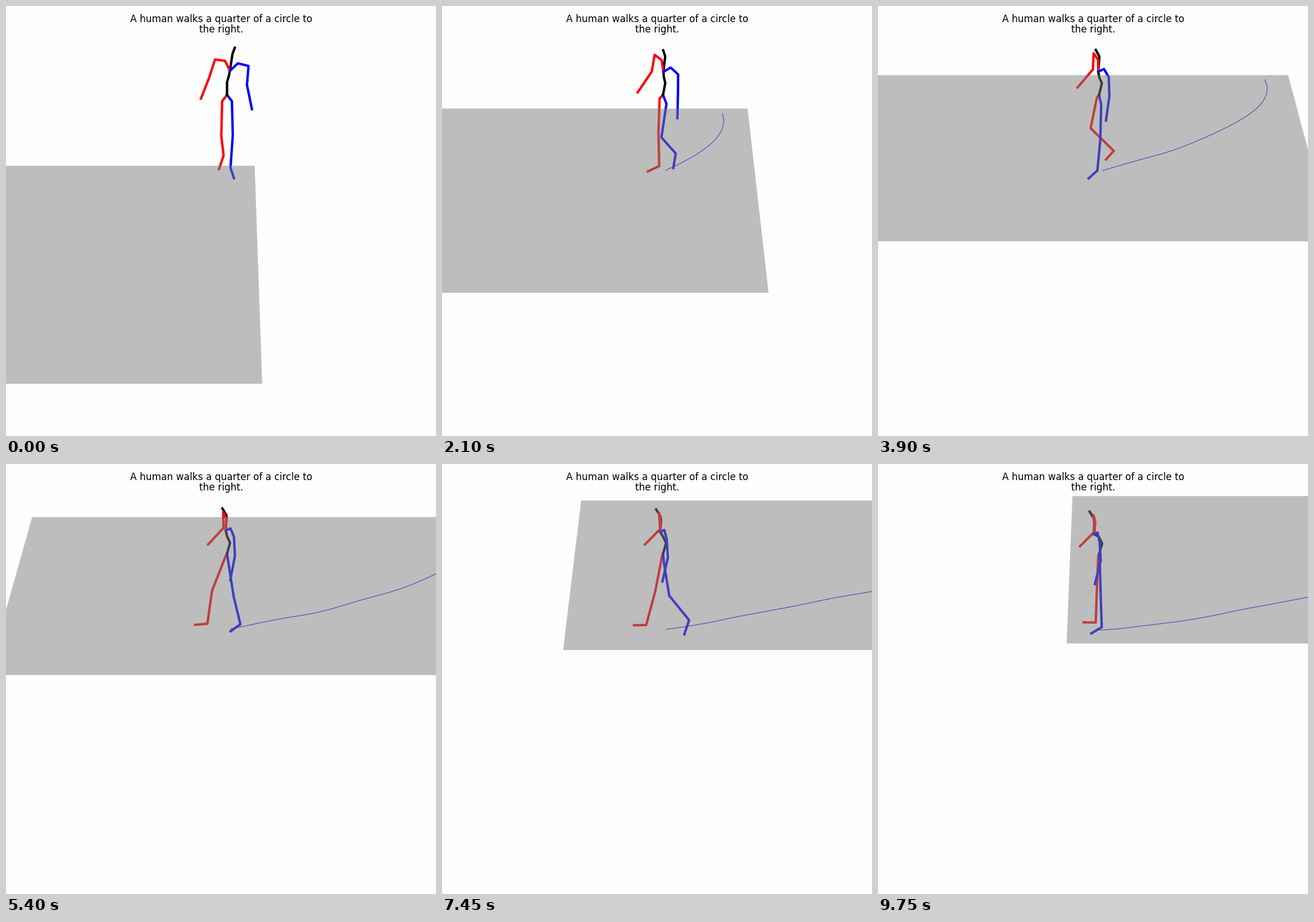
A matplotlib script that plays this animation: 748 px wide and 748 px high, repeating every 9.8 s.

```python
import numpy as np
import matplotlib.pyplot as plt
from matplotlib.animation import FuncAnimation
from matplotlib.patches import Polygon

SIZE, DPI, FPS, FRAMES = 748, 100, 20, 196
CYCLE = 1.45                       # seconds per full walk cycle
TILT = 0.77                        # vertical squeeze of level distances

# Ground camera: screen scale grows as a floor point comes nearer.
CENTER_X, HORIZON, DEPTH, FEET = 384, -1112, 6480, 4.63
FLOOR_X = (-0.6466, 0.0346)

# Key points of the walk: time, sideways, towards the viewer
ROUTE = np.array([
    (0, 0, .034), (1, -.0128, .2066), (2.1, -.0794, .3954),
    (3.9, -.2324, .6286), (5.4, -.365, .7498), (6.55, -.4567, .8343),
    (8, -.5605, .9061), (9, -.6024, .9225), (9.75, -.607, .9215)])


def smooth(t, ts, ys):
    """Cubic Hermite interpolation through the points (ts, ys)."""
    slope = np.gradient(ys, ts, axis=0, edge_order=2)
    i = int(np.clip(np.searchsorted(ts, t, "right") - 1, 0, len(ts) - 2))
    h = ts[i + 1] - ts[i]
    u = (t - ts[i]) / h
    return ((1 + 2 * u) * (1 - u) ** 2 * ys[i] + u * (1 - u) ** 2 * h * slope[i]
            + u * u * (3 - 2 * u) * ys[i + 1] + u * u * (u - 1) * h * slope[i + 1])


def ease(u):
    u = np.clip(u, 0, 1)
    return u * u * (3 - 2 * u)


def bump(phase, start, width):
    u = ((phase - start) % 1) / width
    return np.sin(np.pi * u) ** 2 if u < 1 else 0.0


def walk_phase(t):
    """Walk cycles done; whole numbers are right heel strikes."""
    return np.interp(t, [0, 2.1, 3.9, 5.4, 8.35, 9.2],
                     [.76, 2.26, 3.75, 4.91, 6.6, 7])


def project(x, z):
    """Floor point relative to the walker -> pixels."""
    q = DEPTH / (FEET - z)
    return np.stack([CENTER_X + x * q, q + HORIZON], axis=-1)


def place(points, turn, root_y):
    """Body points (forward, right, up) -> pixels, facing the given way."""
    a, b, h = np.transpose(points)
    s, c = np.sin(turn), np.cos(turn)
    return np.stack([CENTER_X - a * s - b * c,
                     root_y + TILT * (a * c - b * s) - h], axis=-1)


times = np.arange(FRAMES) / FPS
path = np.array([smooth(t, ROUTE[:, 0], ROUTE[:, 1:]) for t in times])
speed = np.hypot(*(np.gradient(path, axis=0) * FPS * (1400, 392)).T)
path[:, 1] -= (0.003 * np.sin(np.pi * times / times[-1])
               * np.sin(2 * np.pi * (walk_phase(times) - 0.1)))


def leg(side, phase, pace, bob):
    """Root, hip, knee, ankle and toe; side is 1 for right, -1 for left."""
    p = phase % 1
    swing = 0.31 - p if p < 0.62 else -0.31 + 0.62 * ease((p - 0.62) / 0.38)
    step = pace * CYCLE * swing - 5 * min(1, pace / 110)
    lift = bump(p, 0.45, 0.6) * min(1, pace / 110)
    push = bump(p, 0.42, 0.48) * min(1, pace / 80)
    ankle = np.array([step, 6 * side, bob - 124 + 13 * lift])
    knee = (0.4 * step + 24 * lift, 10 * side, 9 * lift - 70)
    toe = ankle + (20 - 13 * push, 1 + 7 * side, -3 - 20 * push)
    return [(0, 0, 0), (0, 8.5 * side, -11), knee, ankle, toe]


def arm(side, elbow, wrist):
    """Collar, shoulder, elbow and wrist; the last two as bone vectors."""
    shoulder = np.array([0, 30 * side - 8.5, 57.5])
    collar = (0, 11.5 * side - 8, 58.5)
    return np.array([collar, shoulder, shoulder + elbow,
                     shoulder + elbow + wrist])


def skeleton(n):
    """Pixel lines of both legs, the spine and both arms."""
    t, pace, phase = times[n], speed[n], walk_phase(times[n])
    bob = 1.2 * np.cos(4 * np.pi * phase)
    root_y = 155.3 + bob
    turn = np.radians(82) * (1 - np.exp(-t / 2.6))
    twist = turn + np.radians(14) * np.exp(-t)
    lean = ease((t - 6) / 3.5) * np.array([6, 0, -5])

    spine = np.array([(0, 0, 0), (-5.5, 0, 18), (1, -3, 33),
                      (4, -5, 45), (4, -9.5, 74.5), (13, -13.5, 92)])
    spine[3:] += lean
    back = place(spine, turn, root_y)
    right = arm(1, np.array([-4.5, 12, -38]),
                np.array([24 - 16 * np.exp(-t), 12.5, -32]))
    left = arm(-1, np.array([-3, 3.5, -36]), np.array([12.5, -12, -30.5]))

    legs = [place(leg(1, phase, pace, bob), turn, root_y),
            place(leg(-1, phase + 0.5, pace, bob), turn, root_y)]
    arms = [np.vstack([back[3], place(a + lean, twist, root_y)])
            for a in (right, left)]
    return [*legs, back, *arms]


fig = plt.figure(figsize=(SIZE / DPI, SIZE / DPI), dpi=DPI, facecolor="#fefefe")
ax = fig.add_axes([0, 0, 1, 1])
ax.set_xlim(-0.5, SIZE - 0.5)      # whole numbers are pixel centres
ax.set_ylim(SIZE - 0.5, -0.5)
ax.axis("off")
for y, line in ((27.2, "A human walks a quarter of a circle to"),
                (45.7, "the right.")):
    ax.text(374, y, line, fontsize=12, family="DejaVu Sans",
            ha="center", va="baseline")

trail, = ax.plot([], [], color="blue", lw=0.75, zorder=2)
limbs = [ax.plot([], [], color=c, lw=3, zorder=3)[0]
         for c in ("red", "blue", "black", "red", "blue")]
floor = Polygon(np.zeros((4, 2)), closed=True, facecolor=(0.494,) * 3,
                alpha=0.5, edgecolor="none", lw=0, zorder=5)
ax.add_patch(floor)


def update(n):
    x, z = path[n]
    left, right = FLOOR_X[0] - x, FLOOR_X[1] - x
    floor.set_xy(project(np.array([left, left, right, right]),
                         np.array([-z, 1 - z, 1 - z, -z])))
    past = path[:n] - path[n] if n > 1 else np.empty((0, 2))
    trail.set_data(*project(past[:, 0], past[:, 1]).T)
    for limb, points in zip(limbs, skeleton(n)):
        limb.set_data(*points.T)
    return [trail, *limbs, floor]


anim = FuncAnimation(fig, update, frames=FRAMES, interval=1000 / FPS,
                     init_func=lambda: update(0), repeat=True)
plt.show()
```
